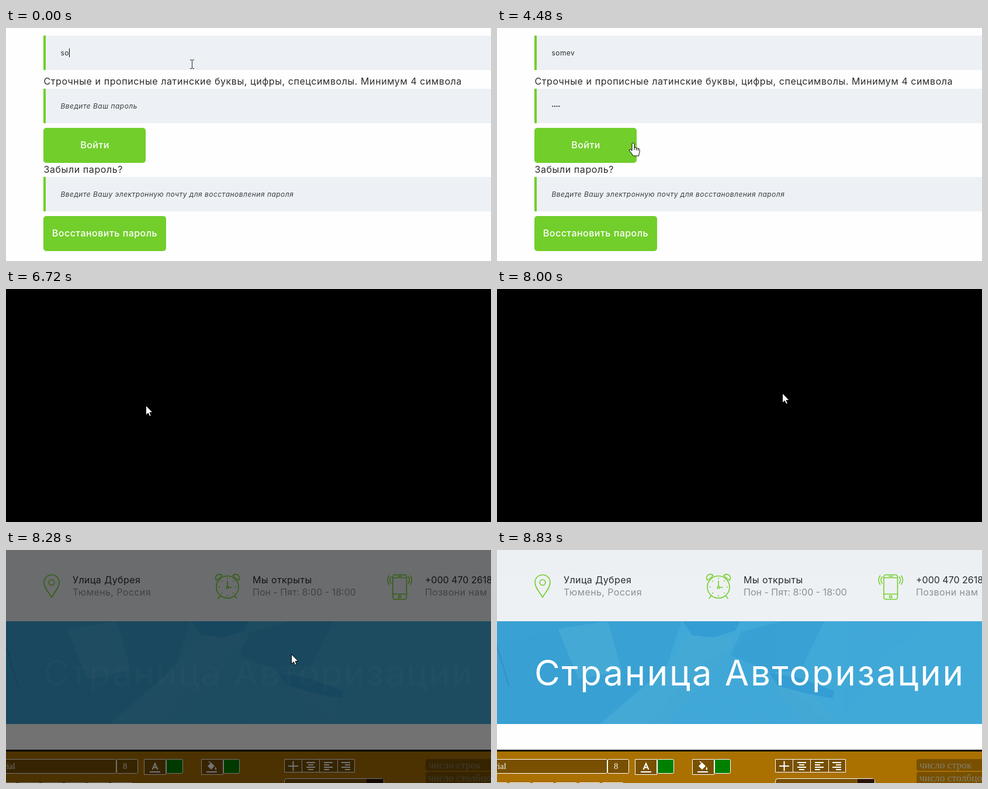
An HTML page that plays this animation: 830 by 399 pixels, repeating every 9260 ms.

```html
<!DOCTYPE html>
<html lang="ru">
<head>
<meta charset="utf-8">
<title>Авторизация</title>
<style>
  html, body { margin: 0; width: 100%; height: 100%; overflow: hidden; background: #fefefe; }
  svg { display: block; width: 100%; height: 100%; }
  text { font: 16px Inter, sans-serif; letter-spacing: .036em; fill: #292c2f; }
  .small { font-size: 12px; }
  .hint { font-size: 12px; font-style: italic; letter-spacing: .04em; fill: #3b3e41; }
  .label { font-weight: 500; letter-spacing: .03em; fill: #fff; text-anchor: middle; }
  .contact { letter-spacing: .025em; }
  .figures { letter-spacing: 0; }
  .muted { fill: #8d9093; }
  .title { font-size: 60px; letter-spacing: .046em; fill: #fff; }
  .serif { font: 14.5px "Liberation Serif", serif; letter-spacing: 0; fill: #fff; }
  .dim { font-size: 17.5px; fill: #85806f; }
  .field { fill: #edf1f5; }
  .green { fill: #72ce2b; }
  .icon { fill: none; stroke: #72ce2b; stroke-width: 1.6; stroke-linecap: round; stroke-linejoin: round; }
  .cell { fill: #785000; stroke: #fff; }
  .swatch { fill: #008000; stroke: #fff; }
  .mark { fill: none; stroke: #fff; stroke-width: 2; }
  .pointer { fill: #fff; stroke: #000; stroke-linejoin: round; }
</style>
</head>
<body>
<svg viewBox="0 0 830 399">
  <defs>
    <pattern id="hatch" width="5" height="5" patternUnits="userSpaceOnUse" patternTransform="rotate(-38)">
      <path d="M0 0V5" stroke="#2b8fc9" stroke-width="1.6" opacity=".3"/>
    </pattern>
    <clipPath id="bannerClip"><path d="M0 122H830V298H0Z"/></clipPath>
  </defs>

  <g id="form">
    <path fill="#fefefe" d="M0 0H830V399H0Z"/>
    <path class="field" d="M64 13H830V72H64ZM64 104H830V163H64ZM64 255H830V314H64Z"/>
    <path class="green" d="M64 13h4v59h-4ZM64 104h4v59h-4ZM64 255h4v59h-4Z"/>
    <text id="login" class="small" x="93.5" y="47"></text>
    <text x="64.5" y="97">Строчные и прописные латинские буквы, цифры, спецсимволы. Минимум 4 символа</text>
    <text id="passwordHint" class="hint" x="93.5" y="138">Введите Ваш пароль</text>
    <path id="dots" fill="none" stroke="#222" stroke-width="2.2" stroke-linecap="round"/>
    <rect class="green" x="64" y="171" width="175" height="60" rx="5"/>
    <text class="label" x="152" y="206">Войти</text>
    <text x="64.5" y="248">Забыли пароль?</text>
    <text class="hint" x="93.5" y="289">Введите Вашу электронную почту для восстановления пароля</text>
    <rect class="green" x="64" y="322" width="210" height="60" rx="5"/>
    <text class="label" x="169" y="357">Восстановить пароль</text>
    <rect id="caret" width="1" height="15" fill="#000"/>
  </g>

  <g id="site">
    <path fill="#fefefe" d="M0 0H830V399H0Z"/>
    <path fill="#eef1f4" d="M0 0H830V122H0Z"/>
    <path fill="#ecf0f3" d="M0 0H830V42H0Z"/>
    <g class="icon">
      <path d="M78 81C72 71 65 64 65 55.5a13 13 0 0 1 26 0C91 64 84 71 78 81Z"/>
      <circle cx="78" cy="55.500" r="4.8"/>
      <circle cx="379" cy="63.500" r="19"/>
      <path d="M360 52a6 6 0 1 1 10-8ZM398 52a6 6 0 1 0-10-8ZM379 53V62M381 64H386M366 79l-3 4M392 79l3 4"/>
      <circle cx="379" cy="64" r="1.800"/>
      <path d="M379 48v1M379 78v1M364 63.500h1M393 63.500h1M369 53l.5.5M389 53l-.5.5M369 74l.5-.5M389 74l-.5-.5"/>
      <rect x="662" y="42.500" width="23.500" height="42" rx="3.500"/>
      <path d="M662 47.500H685.500M662 75.500H685.500M671 45h6M659 46q-4 5.500 0 11M655.500 44q-5 7.500 0 15M688.500 46q4 5.500 0 11M692 44q5 7.500 0 15"/>
      <circle cx="673.700" cy="80" r="2"/>
    </g>
    <text class="contact" x="114" y="57">Улица Дубрея</text>
    <text class="contact muted" x="114" y="78">Тюмень, Россия</text>
    <text class="contact" x="422" y="57">Мы открыты</text>
    <text class="figures muted" x="422" y="78">Пон - Пят: 8:00 - 18:00</text>
    <text class="figures" x="717" y="57">+000 470 2618</text>
    <text class="contact muted" x="717" y="78">Позвони нам</text>

    <g clip-path="url(#bannerClip)">
      <path fill="#41a9d8" d="M0 122H830V298H0Z"/>
      <path fill="#39a1d3" d="M0 122H316L290 200 175 298H0ZM418 140L490 122H560L520 205 470 210 400 180Z"/>
      <path fill="#45a9d6" d="M104 135L190 122 213 206 140 222ZM330 146L412 150 365 215 290 298H180L285 205ZM474 232L540 246 576 292 520 298Z"/>
      <path fill="#349dd3" d="M318 122H416L408 138 370 150 334 146ZM466 210L520 220 578 242 574 254 530 246 480 232Z"/>
      <path fill="url(#hatch)" d="M0 160L104 135 140 222 285 205 180 298H0ZM340 200L480 122 470 210 570 298H260ZM600 122H740L660 185 590 290Z"/>
      <path fill="none" stroke="#318fc8" stroke-width="2" d="M0 165L21 234"/>
    </g>
    <text id="title" class="title" x="64" y="232">Страница Авторизации</text>

    <path d="M0 342H830V346H0Z"/>
    <path fill="#aa7000" d="M0 345H830V399H0Z"/>
    <rect class="cell" x="-20.500" y="358.500" width="209" height="24" rx="2"/>
    <rect class="cell" x="189.500" y="358.500" width="36" height="24" rx="2"/>
    <text class="serif" x="-14" y="375">Arial</text>
    <text class="serif" x="200" y="375">8</text>
    <path class="cell" d="M236.500 358.500h37v26h-37ZM334.500 358.500h37v26h-37Z"/>
    <rect class="swatch" x="274.500" y="358.500" width="28" height="24" rx="2"/>
    <rect class="swatch" x="372.500" y="358.500" width="27" height="24" rx="2"/>
    <path class="mark" d="M250.500 376L255 365.500 259.500 376M252 372.500h6M246 380h18M343 380h18"/>
    <path fill="#fff" d="M345 370L351 364 357 370 351 376ZM358.500 371q3 5 .5 5.500t-.5-5.500Z"/>
    <path class="mark" d="M347 362l4 4" style="stroke-width:1.5"/>
    <path class="cell" d="M476.500 358.500h120v22h-120ZM506.500 358.500v22M536.500 358.500v22M567.500 358.500v22"/>
    <path class="mark" d="M483 370h17M491.500 361.500v17M514 364h15M517 368h9M514 372h15M517 376h9M544 364h15M544 368h9M544 372h15M544 376h9M574 364h15M580 368h9M574 372h15M580 376h9"/>
    <rect class="cell" x="476.500" y="391.500" width="170" height="20" rx="4"/>
    <path fill="#2a1200" d="M617 392h27q2 0 2 3v4h-29Z"/>
    <rect x="718" y="358" width="130" height="20" rx="4" fill="#785000"/>
    <rect x="718" y="380" width="130" height="22" rx="4" fill="#785000"/>
    <text class="serif dim" x="723" y="374">число строк</text>
    <text class="serif dim" x="723" y="396">число столбцов</text>
    <path d="M-18 398.500H216" stroke="#fff" stroke-dasharray="35 4.700"/>
  </g>

  <path id="shade" d="M0 0H830V399H0Z"/>

  <g id="cursor">
    <path id="ibeam" fill="none" stroke="#222" d="M-3 -7.500H-1L.5 -6.500 2 -7.500H4M.5 -6.500V6.500M-3 7.500H-1L.5 6.500 2 7.500H4"/>
    <path id="arrow" class="pointer" d="M.5 .5V17L4.300 13.500 6.800 19 9.300 18 7 12.500H12Z"/>
    <path id="hand" class="pointer" d="M-1 14V2Q1 -1 3 2V9Q5 7 6.500 10Q8.500 8 9.500 11Q12 9.500 12 13V17Q11 19 10.500 23H1.500Q-1 20 -3 17L-5.500 14Q-6 11 -3.500 12ZM3 9V13M6.500 10V13.500M9.500 11V14"/>
  </g>
</svg>
<script>
const LOOP = 9260, TICK = 140.3;
const el = Object.fromEntries([...document.querySelectorAll('[id]')].map(e => [e.id, e]));
const show = (e, on) => e.style.display = on ? '' : 'none';

const path = [
  [0, 318, 62], [13, 318, 62], [15, 305, 115], [17, 292, 160], [29, 292, 160],
  [30, 270, 174], [31, 245, 190], [32, 232, 196], [34, 220, 203], [36, 210, 201],
  [39, 203, 201], [47, 203, 201], [51, 345, 194], [57, 488, 178], [66, 488, 178]
];
const shades = [[0, 0], [48, 1], [57, 1], [59, .55], [61, .18], [63, 0], [66, 0]];
const titleFade = [[0, 0], [58, 0], [59, .06], [61, .6], [63, 1], [66, 1]];
const letters = [[0, 2], [5, 3], [7, 4], [8, 5]];
const typedDots = [[0, 0], [23, 1], [24, 2], [26, 3], [27, 4]];
const caretStates = [[0, 1], [3, 0], [5, 1], [12, 0], [16, 1], [21, 0], [23, 1], [30, 0], [34, 1], [38, 0], [42, 1], [44, 0]];

const held = (list, tick) => list.findLast(k => k[0] <= tick)[1];
function blend(list, tick, i = 1) {
  const n = list.findIndex(k => k[0] >= tick);
  if (n < 1) return list[0][i];
  const a = list[n - 1], b = list[n];
  return a[i] + (b[i] - a[i]) * (tick - a[0]) / (b[0] - a[0]);
}

function drawForm(tick) {
  const dots = held(typedDots, tick);
  el.login.textContent = 'somev'.slice(0, held(letters, tick));
  show(el.passwordHint, !dots);
  el.dots.setAttribute('d', Array.from({ length: dots }, (_, i) => `M${95.3 + 3.6 * i} 134h.01`).join(''));
  const inPassword = tick >= 17;
  const x = inPassword ? 93 + 3.6 * dots : 93.5 + el.login.getComputedTextLength();
  el.caret.setAttribute('x', Math.round(x));
  el.caret.setAttribute('y', inPassword ? 126 : 35);
  show(el.caret, held(caretStates, tick));
}

function drawPointer(tick) {
  const x = Math.round(blend(path, tick)), y = Math.round(blend(path, tick, 2));
  const kind = tick < 30 ? 'ibeam' : tick >= 32 && tick < 46 ? 'hand' : 'arrow';
  for (const name of ['ibeam', 'arrow', 'hand']) show(el[name], name === kind);
  el.cursor.setAttribute('transform', `translate(${x} ${y})`);
  show(el.cursor, tick < 62);
}

function draw(now) {
  const tick = Math.floor(now % LOOP / TICK + .2);
  drawForm(tick);
  drawPointer(tick);
  show(el.form, tick < 48);
  show(el.site, tick >= 48);
  el.shade.style.opacity = tick < 48 ? 0 : blend(shades, tick);
  el.title.style.opacity = blend(titleFade, tick);
}

const start = performance.now();
function loop() {
  draw(performance.now() - start);
  requestAnimationFrame(loop);
}
loop();
</script>
</body>
</html>
```
